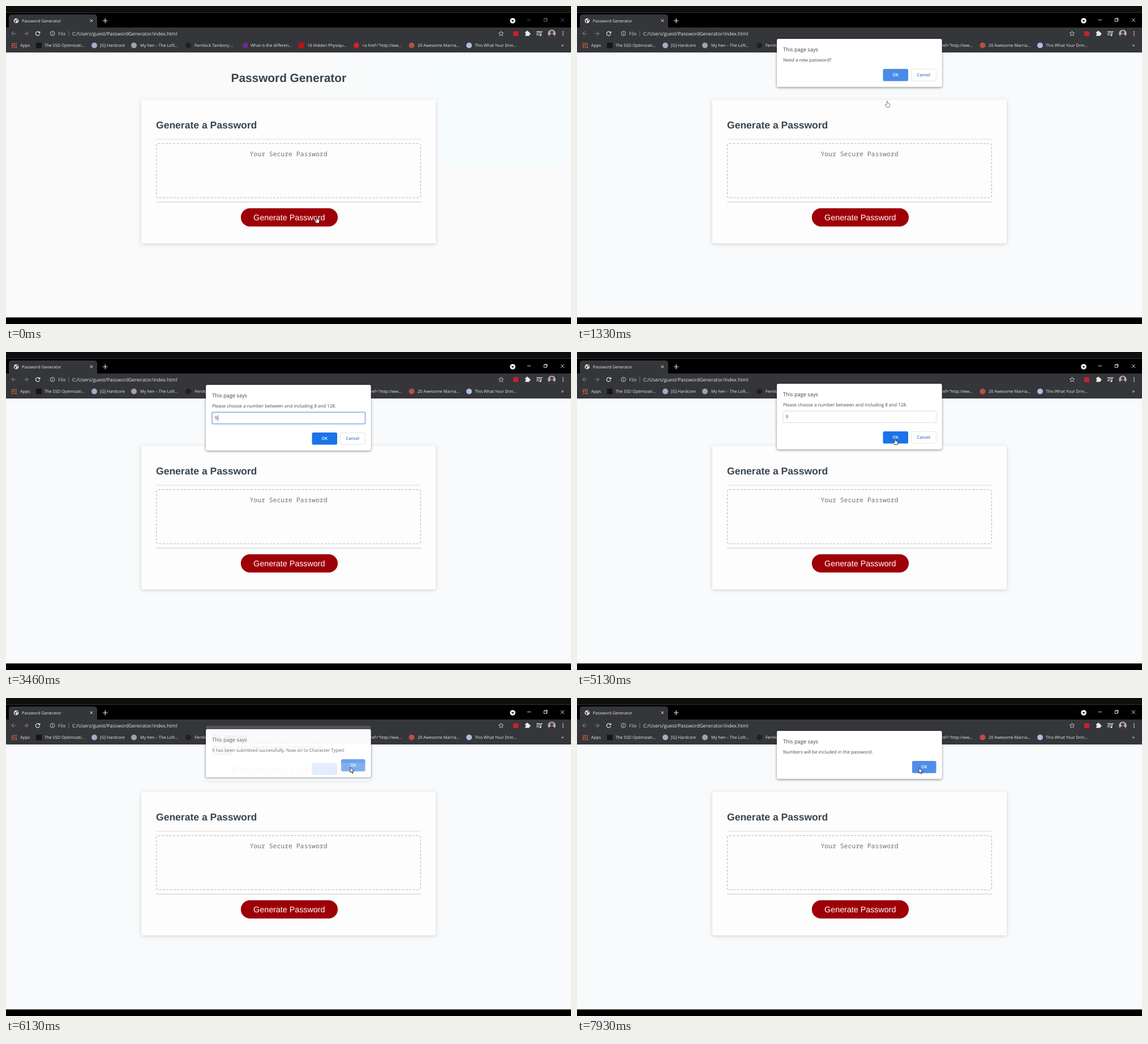
Write an HTML page with a canvas that moves like this. It is 998 by 561 pixels and loops after 8000 ms.

```html
<!DOCTYPE html>
<html lang="en">
<head>
<meta charset="utf-8">
<title>Password Generator</title>
<style>
html, body { margin: 0; width: 100%; height: 100%; overflow: hidden; background: #000; }
canvas { display: block; width: 998px; height: 561px; }
</style>
</head>
<body>
<canvas id="stage"></canvas>
<script>
const W = 998, H = 561, LOOP = 8000;
const canvas = document.getElementById('stage');
const g = canvas.getContext('2d');
const ratio = window.devicePixelRatio || 1;
canvas.width = W * ratio;
canvas.height = H * ratio;

const UI = '"Open Sans", "Noto Sans", sans-serif';
const ARIAL = '"Liberation Sans", Arial, sans-serif';
const MONO = '"Noto Sans Mono", "DejaVu Sans Mono", monospace';
const TAU = Math.PI * 2;
const clamp = v => Math.max(0, Math.min(1, v));

function text(str, x, y, font, color, align = 'left') {
  g.font = font;
  g.fillStyle = color;
  g.textAlign = align;
  g.fillText(str, x, y);
}

function rect(x, y, w, h, color) {
  g.fillStyle = color;
  g.fillRect(x, y, w, h);
}

function box(x, y, w, h, r, fill, stroke, width = 1) {
  g.beginPath();
  g.roundRect(x, y, w, h, r);
  if (fill) { g.fillStyle = fill; g.fill(); }
  if (stroke) { g.strokeStyle = stroke; g.lineWidth = width; g.stroke(); }
}

// The shadow is kept outside the panel so that a faded panel stays clean.
function panel(x, y, w, h, r, fill, shade, blur, dy) {
  g.save();
  g.beginPath();
  g.rect(x - 30, y - 30, w + 60, h + 60);
  g.roundRect(x, y, w, h, r);
  g.clip('evenodd');
  g.shadowColor = shade;
  g.shadowBlur = blur * ratio;
  g.shadowOffsetY = dy * ratio;
  box(x, y, w, h, r, fill);
  g.restore();
  box(x, y, w, h, r, fill);
}

function disc(x, y, r, color) {
  g.fillStyle = color;
  g.beginPath();
  g.arc(x, y, r, 0, TAU);
  g.fill();
}

// Each argument after the width is one polyline: [x, y, x, y, ...]
function lines(color, width, ...paths) {
  g.strokeStyle = color;
  g.lineWidth = width;
  g.beginPath();
  for (const p of paths)
    for (let i = 0; i < p.length; i += 2) g[i ? 'lineTo' : 'moveTo'](p[i], p[i + 1]);
  g.stroke();
}

function poly(points, fill) {
  g.fillStyle = fill;
  g.beginPath();
  for (let i = 0; i < points.length; i += 2) g.lineTo(points[i], points[i + 1]);
  g.closePath();
  g.fill();
}

// ---- Browser frame ----
const BOOKMARKS = [
  [58, 68, 'The SSD Optimizati...', '#161616', 'square'],
  [156, 166, '[G] Hardcore', '#a9aac4'],
  [226, 237, 'My hen – The Loft...', '#a3a3a3'],
  [322, 333, 'Fernlock Tambory:...', '#202022'],
  [423, 432, 'What is the differen...', '#6c2c92'],
  [521.5, 532, '10 Hidden Physiqu...', '#b5131f', 'square'],
  [619, 629, '<a href="http://ww...', '#d3222a'],
  [716.5, 727, '20 Awesome Marria...', '#b9503f'],
  [818, 828, 'This What Your Drin...', '#a9bfdf']
];

function arrowIcon(x, dir) {
  lines('#77797d', 1.1, [x - 4 * dir, 48.5, x + 4 * dir, 48.5], [x, 44.8, x + 4 * dir, 48.5, x, 52.2]);
}

function star(x, y) {
  g.beginPath();
  for (let i = 0; i < 10; i++) {
    const a = i * TAU / 10 - TAU / 4, r = i % 2 ? 2 : 4.6;
    g.lineTo(x + r * Math.cos(a), y + r * Math.sin(a));
  }
  g.closePath();
  g.strokeStyle = '#d5d6d9';
  g.lineWidth = 0.8;
  g.stroke();
}

function drawTabs(active) {
  rect(0, 0, W, 11, '#0e0e0e');
  rect(0, 11, W, 27, '#000');
  rect(0, 11, W, 1, '#333');
  box(5, 15, 156, 24, [5, 5, 0, 0], '#35363a');
  disc(18, 26, 4.3, '#e8eaed');
  poly([14.6, 24.6, 17.4, 25.4, 18.3, 28, 16.6, 29.4], '#35363a');
  poly([18.2, 22.4, 21, 24, 20.6, 26.4, 18.8, 25], '#35363a');
  text('Password Generator', 28, 28.6, '7.3px ' + UI, '#e8eaed');
  lines('#e8eaed', 1, [148.5, 23.5, 153.2, 28.2], [153.2, 23.5, 148.5, 28.2]);
  lines('#e8eaed', 1.2, [171, 26, 179.4, 26], [175.2, 21.8, 175.2, 30.2]);
  disc(895, 26, 4.8, '#f1f3f4');
  poly([892.6, 25, 897.4, 25, 895, 27.9], '#000');

  const c = active ? '#e3e3e3' : '#68696b';
  lines(c, 0.9, [920.5, 24.6, 927, 24.6]);
  g.strokeRect(950.2, 22.8, 4.6, 4.6);
  lines(c, 0.9, [951.6, 22.6, 951.6, 21.6, 956, 21.6, 956, 26, 955, 26]);
  lines(c, 0.9, [979.8, 21.8, 986, 28], [986, 21.8, 979.8, 28]);
}

function drawToolbar() {
  rect(0, 38, W, 44, '#35363a');
  arrowIcon(14, -1);
  arrowIcon(35, 1);
  g.strokeStyle = '#e8eaed';
  g.lineWidth = 1.2;
  g.beginPath();
  g.arc(56, 48.6, 3.6, 0.3, TAU - 0.7);
  g.stroke();
  poly([60.4, 44.2, 60.4, 48, 56.6, 48], '#e8eaed');

  g.strokeStyle = '#d5d6d9';
  g.lineWidth = 0.9;
  g.beginPath();
  g.arc(82, 48.5, 3.9, 0, TAU);
  g.stroke();
  rect(81.5, 48, 1, 2.6, '#d5d6d9');
  rect(81.5, 46, 1, 1, '#d5d6d9');
  text('File', 92, 51.6, '8.5px ' + UI, '#c4c6c9');
  rect(110.5, 43.5, 0.8, 10, '#7d7f83');
  text('C:/Users/guest/PasswordGenerator/index.html', 117, 51.6, '8.5px ' + UI, '#e8eaed');

  star(874.5, 48.8);
  box(896, 44.5, 9, 8.5, 1.5, '#c9202f');
  box(917, 45.4, 7.6, 7.4, 1, '#e8eaed');
  disc(920.6, 45.2, 1.6, '#e8eaed');
  disc(925, 49, 1.6, '#e8eaed');
  disc(917.2, 49.2, 1.2, '#35363a');
  lines('#e8eaed', 1.1, [937, 45.4, 944, 45.4], [937, 48, 944, 48], [937, 50.6, 941, 50.6],
    [945, 51.4, 945, 45.4, 947.6, 45.4]);
  disc(943.8, 51.4, 1.5, '#e8eaed');

  g.save();
  g.beginPath();
  g.arc(964, 48.5, 6.8, 0, TAU);
  g.clip();
  rect(956, 41, 16, 16, '#b9b1b5');
  disc(964, 46.6, 3, '#59423f');
  disc(964, 55, 5.4, '#3a3038');
  g.restore();
  for (let i = -1; i < 2; i++) disc(984, 48.5 + i * 3.2, 0.9, '#e8eaed');

  const hues = ['#d9483b', '#e07a3a', '#c9574f'];
  for (let i = 0; i < 9; i++)
    rect(10 + (i % 3) * 3.4, 65.5 + Math.floor(i / 3) * 3.3, 2.1, 2.1, hues[(i + Math.floor(i / 3)) % 3]);
  const font = '7.35px ' + UI;
  text('Apps', 25, 72.2, font, '#e8eaed');
  for (const [ix, tx, label, color, shape] of BOOKMARKS) {
    if (shape) rect(ix - 5, 64.5, 10, 10, color);
    else disc(ix, 69.5, 5, color);
    text(label, tx, 72.2, font, '#e8eaed');
  }
  text('»', 983, 72, '9px ' + UI, '#e8eaed', 'center');
}

// ---- Page ----
function drawPage(active) {
  rect(0, 82, W, 467.4, active ? '#f8fafc' : '#fafafa');
  if (!active) {
    const tint = g.createLinearGradient(540, 0, 800, 0);
    tint.addColorStop(0, '#f6fcfe00');
    tint.addColorStop(1, '#f6fcfe');
    rect(540, 82, W - 540, 198, tint);
  }
  text('Password Generator', 499.3, 134, 'bold 20.8px ' + ARIAL, '#39444d', 'center');

  panel(239, 165.5, 520, 253, 2.5, '#fdfdfd', 'rgba(0,0,0,.17)', 6, 1.5);
  text('Generate a Password', 265, 216, 'bold 17.55px ' + ARIAL, '#39444d');
  rect(265, 234.5, 468, 1.2, '#e2e2e3');
  rect(265, 345.2, 468, 1.4, '#d8d8d9');
  g.setLineDash([3.9, 2.6]);
  box(265.6, 242.6, 466.8, 95.8, 3.5, null, '#c2c2c2', 1.3);
  g.setLineDash([]);
  text('Your Secure Password', 499, 265, '11.43px ' + MONO, '#757575', 'center');

  box(414.8, 356.8, 171.2, 32.2, 16.1, '#9e0008');
  text('Generate Password', 500.3, 378, '14.3px ' + ARIAL, '#fff', 'center');
}

// ---- Dialogs ----
const FADE = 250, LAG = 0.2;
const DIALOGS = [
  { start: 130, end: 2465, msg: ['Need a new password?'], cancel: true, btn: 111, blue: '#4a8be7' },
  { start: 2465, end: 5080, msg: ['Please choose a number between and including 8 and 128.'],
    cancel: true, btn: 142, input: true, blue: '#1a73e8' },
  { start: 5080, end: 6055, msg: ['9 has been submitted successfully. Now on to Character Types!'],
    btn: 111, blue: '#4f8fe9' },
  { start: 6055, end: 6810, msg: ['Would you like to have any numeric characters to be', 'included?'],
    cancel: true, btn: 123.5, blue: '#4a8be7' },
  { start: 6810, end: Infinity, msg: ['Numbers will be included in the password.'], btn: 111, blue: '#4f8fe9' }
];

function caretOn(t) {
  return t < 3130 || (t >= 3200 && t < 4000) || (t >= 4330 && t < 4860);
}

function drawInput(t) {
  const focus = t < 4930;
  box(364, 106.2, 270.5, 20.6, 1.5, '#fefefe', focus ? '#86abe6' : '#dcdde0', focus ? 1.6 : 1);
  const typed = t >= 3200;
  if (typed) text('9', 368.6, 119.4, '8px ' + UI, '#3c4043');
  if (caretOn(t)) rect(typed ? 373.8 : 368.5, 111.5, 0.8, 10, '#333');
}

function drawDialog(d, t) {
  const p = Math.min(clamp((t - d.start) / FADE - LAG), clamp(1 - (t - d.end) / FADE));
  if (p <= 0) return;
  g.save();
  g.globalAlpha = Math.min(1, p * 1.4);
  g.translate(0, -10 * (1 - p));
  panel(353, 58, 291.5, d.btn - 26.5, 3, '#fff', 'rgba(0,0,0,.5)', 4, 1.2);
  text('This page says', 364, 79.6, '9.24px ' + UI, '#3c4043');
  d.msg.forEach((m, i) => text(m, 364, 98 + i * 12, '8px ' + UI, '#45494d'));
  if (d.input) drawInput(t);

  const okX = d.cancel ? 540.5 : 592, okW = d.cancel ? 44.5 : 42.5;
  const base = d.btn + 13.3, font = '600 7.4px ' + UI;
  box(okX, d.btn, okW, 21.5, 2.5, d.blue);
  text('OK', okX + okW / 2, base, font, '#fff', 'center');
  if (d.cancel) {
    box(590.4, d.btn + 0.4, 44, 20.6, 2.5, '#fff', '#dfe1e5', 0.9);
    text('Cancel', 612.3, base, font, '#3f79d0', 'center');
  }
  g.restore();
}

// ---- Pointer: time, x, y ----
const PATH = [
  [0, 549, 372], [1180, 549, 372], [1330, 548, 167.5], [1560, 561, 122], [2600, 561, 122],
  [4860, 566, 132], [5040, 562, 152.5], [5230, 562, 152.5], [5600, 608, 122], [6200, 608, 122],
  [6520, 562, 133], [6860, 562, 135], [7000, 572, 137.5], [7200, 604, 123], [LOOP, 604, 123]
];

function pointerAt(t) {
  const i = PATH.findIndex(k => k[0] > t);
  const [t0, x0, y0] = PATH[i - 1], [t1, x1, y1] = PATH[i];
  const u = (t - t0) / (t1 - t0), e = u * u * (3 - 2 * u);
  return [x0 + (x1 - x0) * e, y0 + (y1 - y0) * e];
}

const ARROW = new Path2D('M0 0V9.6L2.2 7.6L3.7 11L5.3 10.3L3.8 7H6.8Z');
const HAND = new Path2D('M-.9 .8Q0-.6 .9 .8V4L4 4.8Q5 5.2 4.8 6.6L4 11H-1.2L-3.6 7.4Q-4 6-2.6 6.3L-.9 7.4Z');

function drawPointer(t) {
  if (t >= 2520 && t < 4860) return;
  const hand = t < 1420 || (t >= 4960 && t < 5300);
  const [x, y] = pointerAt(t);
  g.save();
  g.translate(x, y);
  g.lineWidth = 0.9;
  g.lineJoin = 'round';
  g.strokeStyle = t > 1180 && t < 1420 ? '#777' : '#222';
  g.fillStyle = '#fff';
  const shape = hand ? HAND : ARROW;
  g.fill(shape);
  g.stroke(shape);
  g.restore();
}

function render(t) {
  g.setTransform(ratio, 0, 0, ratio, 0, 0);
  g.textRendering = 'geometricPrecision';
  const active = t >= 130;
  rect(0, 0, W, H, '#000');
  drawTabs(active);
  drawToolbar();
  drawPage(active);
  for (const d of DIALOGS) drawDialog(d, t);
  drawPointer(t);
}

const begin = performance.now();
function tick(now) {
  render(Math.max(0, now - begin) % LOOP);
  requestAnimationFrame(tick);
}
render(0);
requestAnimationFrame(tick);
</script>
</body>
</html>
```
